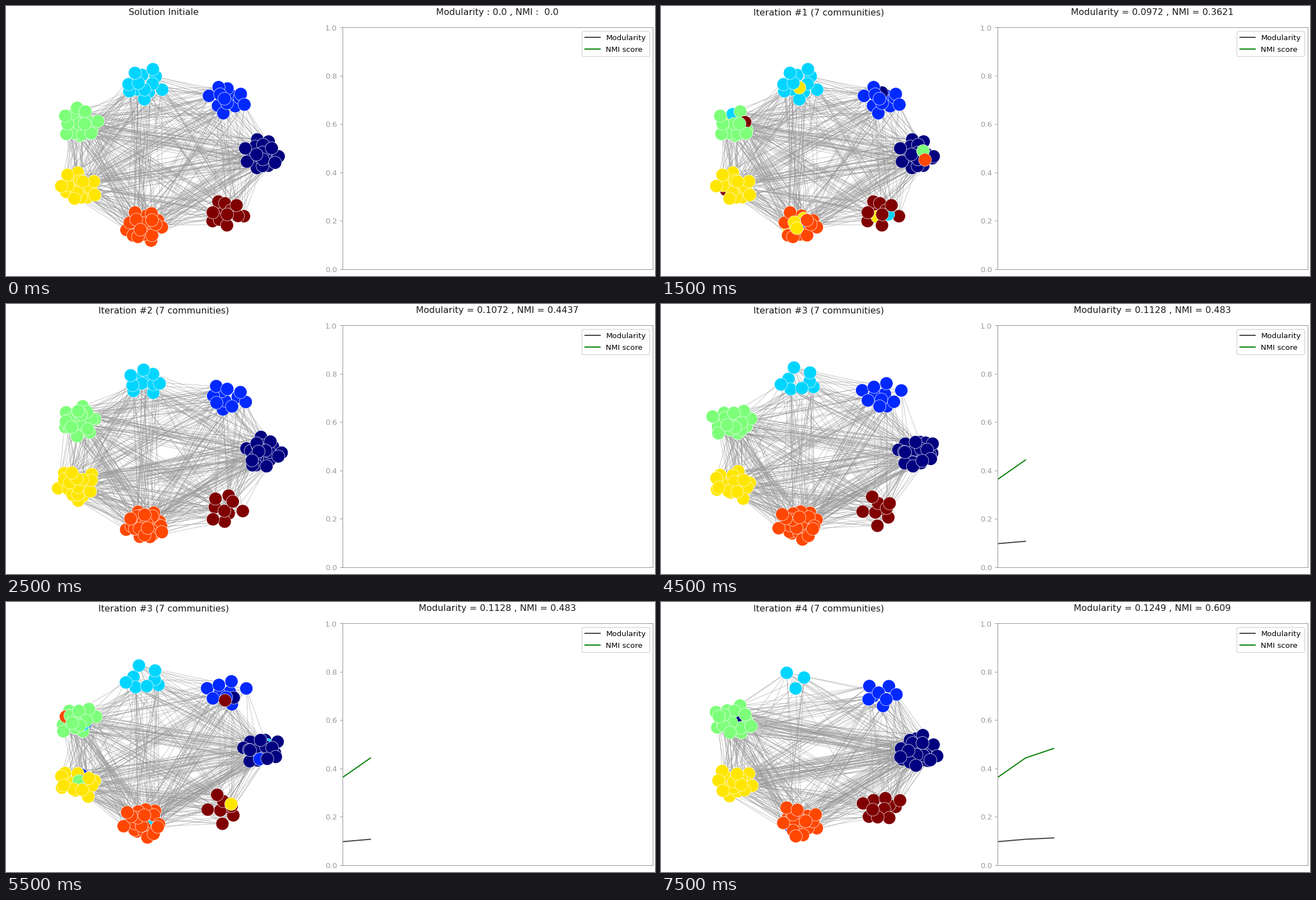
A matplotlib script that plays this animation: 1159x483 px, repeating every 8 s.

```python
import math
import random

import matplotlib.pyplot as plt
from matplotlib.animation import FuncAnimation
from matplotlib.collections import LineCollection

W, H, DPI = 1159, 483, 96
GREY = "#999999"
PALETTE = [plt.get_cmap("jet")(i / 6) for i in range(7)]

RING_CENTRE, RING_RADII = (285, 267), (173, 130)
CLUSTER_RADII = (35, 27)
GOLDEN_ANGLE = math.pi * (3 - math.sqrt(5))
EDGE_COUNT, INNER_EDGES = 613, 0.13

# One row per iteration, from the right-hand community anticlockwise.
SIZES = [
    (20, 13, 13, 19, 18, 20, 12),
    (20, 11, 11, 19, 20, 25, 9),
    (22, 11, 8, 18, 18, 29, 9),
    (29, 8, 3, 22, 20, 22, 11),
]
MOVES = [18, 13, 14, 6]
MODULARITY = [0.0972, 0.1072, 0.1128, 0.1249]
NMI = [0.3621, 0.4437, 0.483, 0.609]

# iteration, progress of the moves, recoloured
STEPS = [(0, 0, False), (1, 0.5, False), (1, 1, True)]
STEPS += [(i, p, p == 1) for i in (2, 3, 4) for p in (0, 1)]

plt.rcParams["font.family"] = "DejaVu Sans"


def ring_point(community):
    angle = 2 * math.pi * community / 7
    return (RING_CENTRE[0] + RING_RADII[0] * math.cos(angle),
            RING_CENTRE[1] - RING_RADII[1] * math.sin(angle))


def cluster_offsets(size, rng):
    """Jittered sunflower pattern in random drawing order."""
    turn = rng.uniform(0, 2 * math.pi)
    offsets = []
    for k in range(size):
        radius = ((k + 0.5) / size) ** 0.55
        angle = turn + k * GOLDEN_ANGLE
        offsets.append((CLUSTER_RADII[0] * radius * math.cos(angle) + rng.gauss(0, 3),
                        CLUSTER_RADII[1] * radius * math.sin(angle) + rng.gauss(0, 3)))
    rng.shuffle(offsets)
    return offsets


class Layout:
    def __init__(self, sizes, moves, seed):
        rng = random.Random(seed)
        self.home = [c for c, size in enumerate(sizes) for _ in range(size)]
        self.offsets = [o for size in sizes for o in cluster_offsets(size, rng)]
        self.target = list(self.home)
        for node in rng.sample(range(len(self.home)), moves):
            others = [c for c in range(7) if c != self.home[node]]
            self.target[node] = rng.choice(others)
        self.edges = [self.pick_edge(rng) for _ in range(EDGE_COUNT)]

    def pick_edge(self, rng):
        inner = rng.random() < INNER_EDGES
        while True:
            a, b = rng.sample(range(len(self.home)), 2)
            if not inner or self.home[a] == self.home[b]:
                return a, b

    def points(self, progress):
        """Nodes that change community draw in towards their old centre."""
        points = []
        for home, target, (dx, dy) in zip(self.home, self.target, self.offsets):
            scale = 1 - 0.4 * progress * (home != target)
            x, y = ring_point(home)
            points.append((x + dx * scale, y + dy * scale))
        return points

    def colors(self, moved):
        return [PALETTE[c] for c in (self.target if moved else self.home)]


layouts = [Layout(sizes, moves, seed)
           for seed, (sizes, moves) in enumerate(zip(SIZES, MOVES), 11)]

fig = plt.figure(figsize=((W + 0.01) / DPI, (H + 0.01) / DPI), dpi=DPI,
                 facecolor="white")

graph = fig.add_axes([0, 0, 1, 1])
graph.set(xlim=(0, W), ylim=(H, 0))
graph.axis("off")
links = graph.add_collection(LineCollection([], colors=GREY, linewidths=0.4,
                                            zorder=1))
dots = graph.scatter([], [], s=300, edgecolors="white", linewidths=0.5,
                     zorder=2)
title_style = dict(fontsize=12, color="#1a1a1a", ha="center", va="baseline")
left_title = graph.text(281.5, 16.3, "", **title_style)
right_title = graph.text(877.8, 16.3, "", **title_style)

chart = fig.add_axes([600.5 / W, 1 - 470.8 / H, 554.7 / W, 432.3 / H])
chart.set(xlim=(0, 11), ylim=(0, 1), xticks=[])
chart.tick_params(colors=GREY)
for spine in chart.spines.values():
    spine.set_color(GREY)
mod_line, = chart.plot([], [], color="#444444", label="Modularity")
nmi_line, = chart.plot([], [], color="green", label="NMI score")
chart.legend(loc="upper right", borderpad=0.44, labelspacing=0.56)


def update(frame):
    iteration, progress, moved = STEPS[(frame + 1) // 2]
    layout = layouts[max(iteration - 1, 0)]
    points = layout.points(progress)
    dots.set_offsets(points)
    dots.set_facecolors(layout.colors(moved))
    links.set_segments([(points[a], points[b]) for a, b in layout.edges])

    if iteration == 0:
        left_title.set_text("Solution Initiale")
        right_title.set_text("Modularity : 0.0 , NMI :  0.0")
    else:
        left_title.set_text(f"Iteration #{iteration} (7 communities)")
        right_title.set_text(f"Modularity = {MODULARITY[iteration - 1]} , "
                             f"NMI = {NMI[iteration - 1]}")

    # The curves trail the titles by one iteration.
    shown = max(iteration - 1, 0)
    mod_line.set_data(range(shown), MODULARITY[:shown])
    nmi_line.set_data(range(shown), NMI[:shown])
    return links, dots, left_title, right_title, mod_line, nmi_line


anim = FuncAnimation(fig, update, frames=16, interval=500, repeat=True,
                     repeat_delay=0, blit=False)
plt.show()
```
